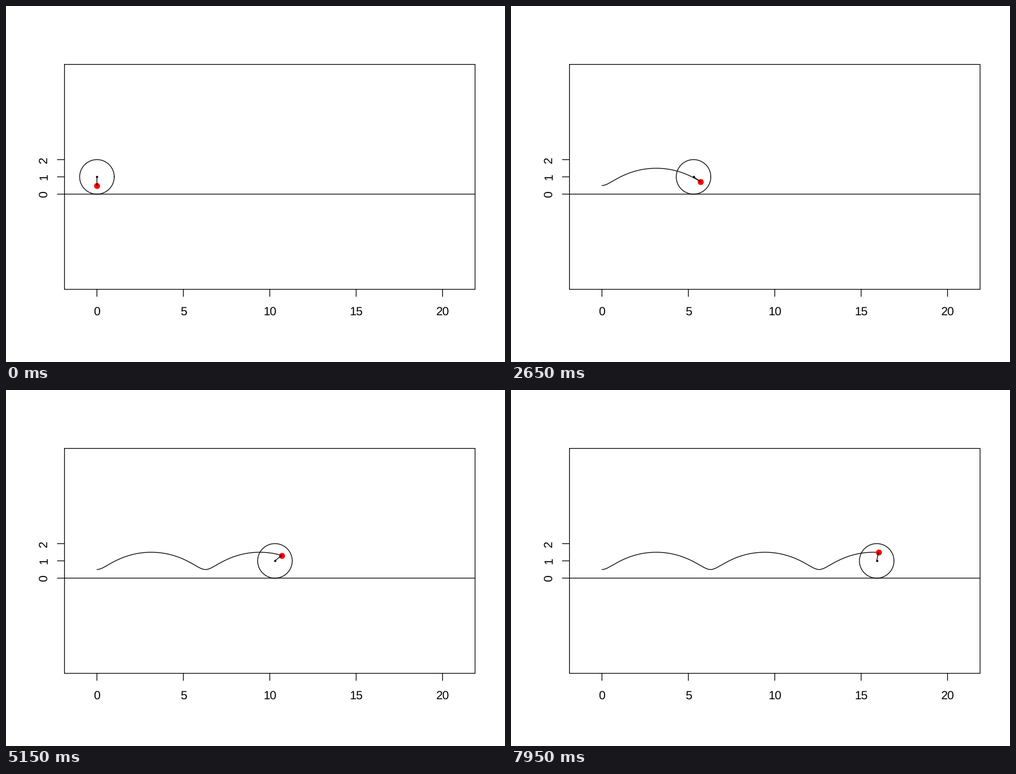
These frames come from a looping animation (885 by 632 pixels, 8 s). A matplotlib script:

```python
import numpy as np
import matplotlib as mpl
import matplotlib.pyplot as plt
from matplotlib.animation import FuncAnimation

mpl.rcParams["font.family"] = "Liberation Sans"
mpl.rcParams["text.hinting"] = "none"
mpl.rcParams["path.snap"] = False
mpl.rcParams["toolbar"] = "None"

W, H, DPI = 885, 632, 64
PT = 72 / DPI                 # points per pixel
INCH = W / 7                  # plot laid out as a 7 x 5 inch page
LINE = 0.2 * INCH             # one margin line of text
LWD = INCH / 96 * PT
FONT = INCH / 6 * PT

LEFT, RIGHT = 4.1 * LINE, W - 2.1 * LINE
TOP, BOTTOM = 4.1 * LINE, H - 5.1 * LINE
X_MIN, X_MAX = -1.88, 21.88
UNIT = (RIGHT - LEFT) / (X_MAX - X_MIN)

FRAMES, INTERVAL, STEP = 160, 50, 0.1
ARM = 0.5


def px(x):
    return LEFT + (x - X_MIN) * UNIT


def py(y):
    return (TOP + BOTTOM) / 2 - (y - 1) * UNIT


def pen(t):
    """Point on the arm of a unit wheel rolled by angle t."""
    return t - ARM * np.sin(t), 1 - ARM * np.cos(t)


fig = plt.figure(figsize=(W / DPI, H / DPI), dpi=DPI, facecolor="white")
ax = fig.add_axes([0, 0, 1, 1])
ax.set_xlim(0, W)
ax.set_ylim(H, 0)
ax.axis("off")


def stroke(xs=(), ys=(), z=2, cap="round"):
    line, = ax.plot(xs, ys, color="black", lw=LWD, zorder=z,
                    solid_capstyle=cap, solid_joinstyle="round")
    return line


def dot(size, color, z):
    mark, = ax.plot([], [], "o", ms=size * PT, color=color, mew=0, zorder=z)
    return mark


# Box, ground line and axes
stroke([LEFT, RIGHT, RIGHT, LEFT, LEFT], [TOP, TOP, BOTTOM, BOTTOM, TOP])
stroke([LEFT, RIGHT], [py(0), py(0)], cap="butt")
for v in range(0, 21, 5):
    stroke([px(v)] * 2, [BOTTOM, BOTTOM + LINE / 2])
    ax.text(px(v), BOTTOM + 1.8 * LINE, str(v), size=FONT,
            ha="center", va="baseline")
for v in range(3):
    stroke([LEFT - LINE / 2, LEFT], [py(v)] * 2)
    ax.text(LEFT - 1.2 * LINE, py(v), str(v), size=FONT, rotation=90,
            rotation_mode="anchor", ha="center", va="baseline")

wheel = stroke(z=3)
trail = stroke(z=4)
tip = dot(10.6, "red", 5)
arm = stroke(z=6)
hub = dot(3.9, "black", 7)

ring = np.linspace(0, 2 * np.pi, 101)


def update(i):
    t = i * STEP
    x, y = pen(t)
    tx, ty = pen(np.arange(i + 1) * STEP)
    wheel.set_data(px(t + np.cos(ring)), py(1 + np.sin(ring)))
    trail.set_data(px(tx), py(ty))
    tip.set_data([px(x)], [py(y)])
    arm.set_data([px(t), px(x)], [py(1), py(y)])
    hub.set_data([px(t)], [py(1)])
    return wheel, trail, tip, arm, hub


anim = FuncAnimation(fig, update, frames=FRAMES, interval=INTERVAL,
                     init_func=lambda: update(0), repeat=True,
                     repeat_delay=0, blit=False)
plt.show()
```
